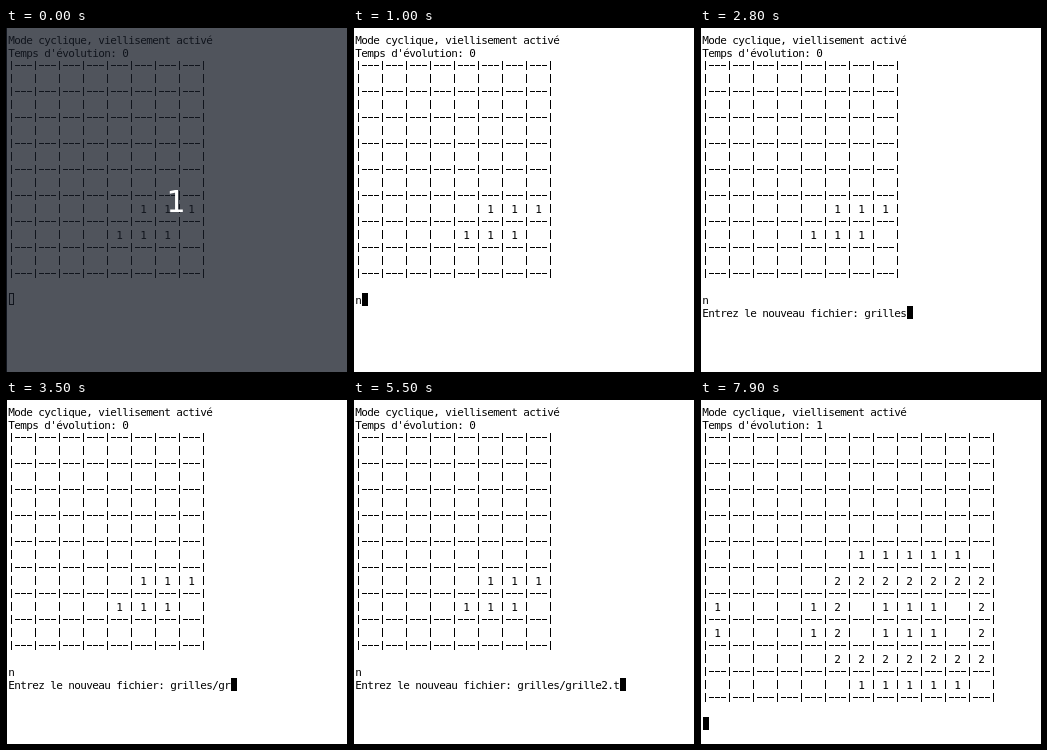
Animation of 341x344 px, one loop 8000 ms. Source, as an HTML page with a canvas:

```html
<!DOCTYPE html>
<html lang="fr">
<head>
<meta charset="utf-8">
<style>
html, body { margin: 0; overflow: hidden; background: #fff; }
canvas { display: block; }
</style>
</head>
<body>
<canvas id="term" width="341" height="344"></canvas>
<script>
const ctx = document.getElementById('term').getContext('2d');
const LOOP = 8000, CHAR_W = 6, LINE_H = 13, LEFT = 3, TOP = 5;
const PROMPT = 'Entrez le nouveau fichier: ';
const FILE = 'grilles/grille2.txt';
const KEY_TIMES = [1800, 2000, 2100, 2200, 2500, 2600, 2800, 3100, 3300, 3500,
  3600, 3800, 3900, 3900, 4200, 5000, 5500, 6100, 6400];

const makeGrid = (rows, cols, alive) =>
  Array.from({ length: rows }, (_, r) =>
    Array.from({ length: cols }, (_, c) => +alive(r, c)));

// Life on a torus; living cells grow older by one.
function evolve(grid) {
  const h = grid.length, w = grid[0].length;
  return grid.map((row, r) => row.map((age, c) => {
    let n = 0;
    for (let dr = -1; dr <= 1; dr++)
      for (let dc = -1; dc <= 1; dc++)
        if ((dr || dc) && grid[(r + dr + h) % h][(c + dc + w) % w]) n++;
    return n === 3 || (age && n === 2) ? age + 1 : 0;
  }));
}

const toad = makeGrid(8, 8, (r, c) => (r === 5 && c > 4) || (r === 6 && c > 3 && c < 7));
const ring = makeGrid(10, 12, (r, c) =>
  r > 4 && r < 9 && c > 4 && (r === 5 || r === 8 || c === 5 || c === 11));
const ringNext = evolve(ring);

function screenLines(grid, time) {
  const rule = '|' + '---|'.repeat(grid[0].length);
  const lines = ['Mode cyclique, viellisement activé', "Temps d'évolution: " + time, rule];
  for (const row of grid)
    lines.push('|' + row.map(age => ` ${age || ' '} |`).join(''), rule);
  return [...lines, ''];
}

function drawChar(ch, x, y) {
  if (ch === '|') ctx.fillRect(x + 2, y + 2, 1, 9);
  else if (ch === '-') ctx.fillRect(x, y + 6, 5, 1);
  else if (ch !== ' ') ctx.fillText(ch, x + 2.5, y + 11);
}

function drawCursor(col, row, focused) {
  const x = LEFT + col * CHAR_W, y = TOP + row * LINE_H;
  if (focused) ctx.fillRect(x, y, CHAR_W, LINE_H);
  else ctx.strokeRect(x + .5, y + .5, 4, 11);
}

function drawCountdown() {
  ctx.fillStyle = 'rgba(22, 27, 38, .75)';
  ctx.fillRect(0, 0, 341, 344);
  ctx.fillStyle = '#fff';
  ctx.font = '30px "DejaVu Sans", sans-serif';
  ctx.fillText('1', 170, 184);
}

function draw(now) {
  const t = now % LOOP;
  const loaded = t >= 6700, next = t >= 7900;
  const lines = screenLines(next ? ringNext : loaded ? ring : toad, +next);
  if (!loaded) {
    lines.push(t >= 1000 ? 'n' : '');
    if (t >= 1400)
      lines.push(PROMPT + FILE.slice(0, KEY_TIMES.filter(k => k <= t).length));
  } else lines.push('');

  ctx.fillStyle = '#fff';
  ctx.fillRect(0, 0, 341, 344);
  ctx.fillStyle = ctx.strokeStyle = '#000';
  ctx.fillRect(0, 0, 1, 344);
  ctx.font = '11px "DejaVu Sans Mono", monospace';
  ctx.textAlign = 'center';
  lines.forEach((line, row) => [...line].forEach((ch, col) =>
    drawChar(ch, LEFT + col * CHAR_W, TOP + row * LINE_H)));
  drawCursor(lines.at(-1).length, lines.length - 1, t >= 400);
  if (t < 200) drawCountdown();
  requestAnimationFrame(draw);
}
draw(0);
</script>
</body>
</html>
```
